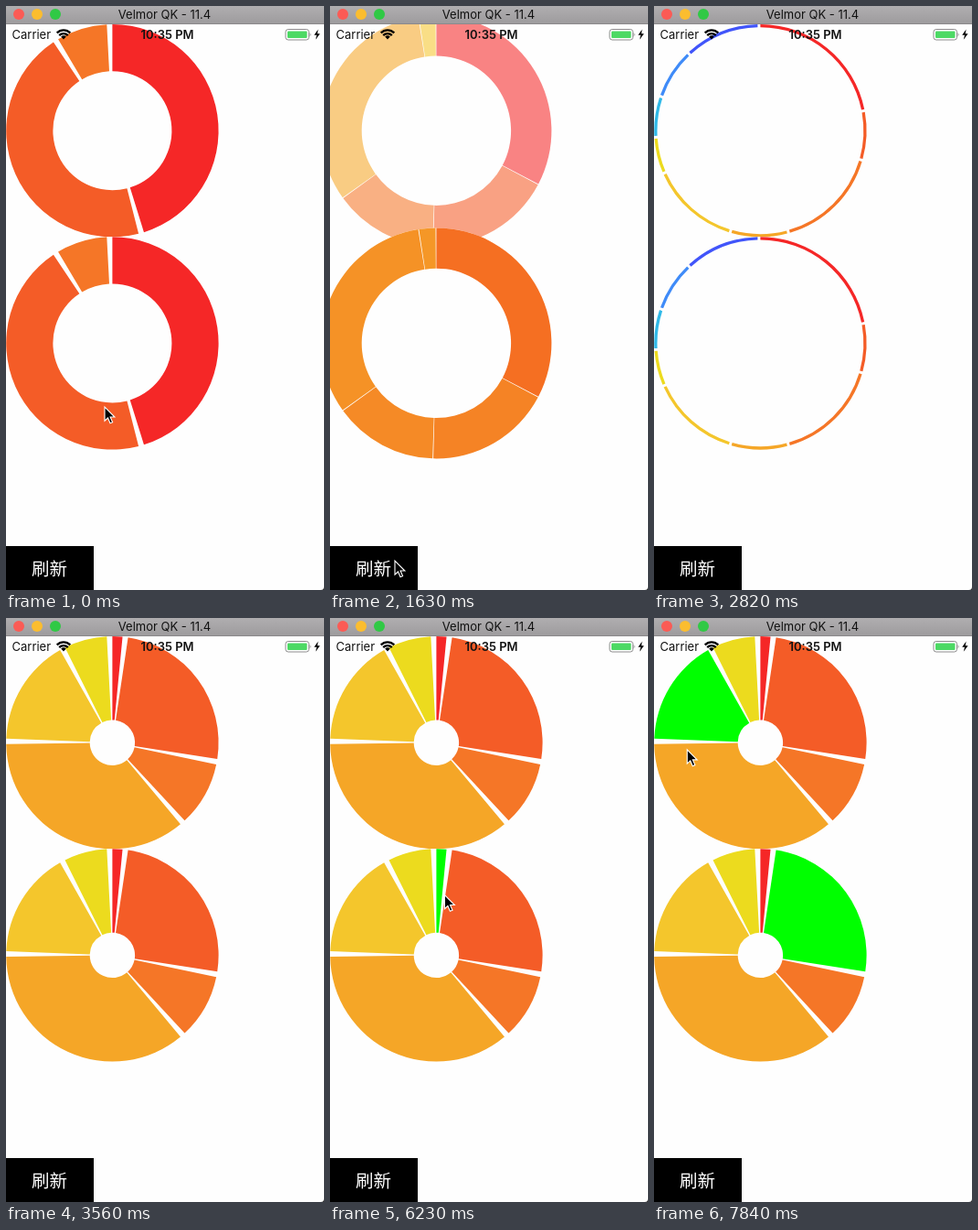
An HTML page for the animation above (7990 ms loop, 348 by 638 pixels).

```html
<!DOCTYPE html>
<html lang="en">
<head>
<meta charset="utf-8">
<title>Ring chart</title>
<style>
  html, body { margin: 0; width: 100%; height: 100%; overflow: hidden; background: #fefefe; }
  svg { display: block; width: 348px; height: 638px; }
  text { font-family: Inter, Roboto, sans-serif; font-size: 13px; }
  .cjk { font-family: "Noto Sans CJK SC", "Noto Sans CJK", sans-serif; font-size: 19.5px; font-weight: 300; }
</style>
</head>
<body>
<svg viewBox="0 0 348 638">
  <defs>
    <linearGradient id="bar" x2="0" y2="1">
      <stop offset="0" stop-color="#b0aeb0"/>
      <stop offset="1" stop-color="#9d9b9d"/>
    </linearGradient>
    <clipPath id="upper"><rect width="348" height="252.3"/></clipPath>
  </defs>
  <rect width="348" height="638" fill="#fefefe"/>
  <g id="top" clip-path="url(#upper)"></g>
  <g id="bottom"></g>

  <text x="6.5" y="35.8" fill="#111">Carrier</text>
  <g fill="none" stroke="#000" stroke-width="2.3">
    <path d="M55.7 29.4A10.3 10.3 0 0 1 70.3 29.4"/>
    <path d="M58.2 32.1A6.8 6.8 0 0 1 67.8 32.1"/>
  </g>
  <path d="M60.2 33.6A4 4 0 0 1 65.8 33.6L63 36.6Z"/>
  <text x="176.5" y="35.8" text-anchor="middle" font-weight="600" fill="#111">10:35 PM</text>
  <rect x="306" y="25.5" width="25.5" height="11.5" rx="2.8" fill="#fff" stroke="#8c8c8c"/>
  <rect x="308" y="27.4" width="21.5" height="7.7" rx="1" fill="#4cd964"/>
  <path d="M332.6 29.3Q334.6 31.2 332.6 33.2Z" fill="#8c8c8c"/>
  <path d="M341.6 25.6L337.2 31.8H340L338.8 36.8L343.6 30.2H340.7Z"/>

  <rect width="348" height="19.5" fill="url(#bar)"/>
  <rect y="19" width="348" height="1" fill="#8b898b"/>
  <circle cx="14" cy="9" r="6" fill="#fb5b55"/>
  <circle cx="34" cy="9" r="6" fill="#fbbd2f"/>
  <circle cx="54" cy="9" r="6" fill="#30c945"/>
  <text x="173.5" y="14" text-anchor="middle" fill="#111">Velmor QK - 11.4</text>

  <rect y="590" width="96" height="48"/>
  <text class="cjk" x="28" y="621.5" fill="#fff">刷新</text>
  <path d="M348 634.5V638H344.5Q348 638 348 634.5Z" fill="#222"/>
  <path id="cursor" d="M0 0V15.2L3.5 12L6 17.8L8.6 16.7L6.1 11H10.9Z" stroke="#fff" stroke-width="1.1"/>
</svg>
<script>
const LOOP = 7990, STEP = 148, CX = 116.4, CY = [136.2, 368.4], R = 116.2;
const BACK = '#fefefe', GREEN = '#00ff00';

const clamp = v => Math.max(0, Math.min(1, v));
const mix = (a, b, p) => a + (b - a) * p;

function blend(a, b, p) {
  const part = (c, i) => parseInt(c.slice(i, i + 2), 16);
  const hex = i => Math.round(mix(part(a, i), part(b, i), p)).toString(16).padStart(2, '0');
  return '#' + [1, 3, 5].map(hex).join('');
}

function polar(cy, r, deg) {
  const q = deg * Math.PI / 180;
  return [CX + r * Math.sin(q), cy - r * Math.cos(q)];
}

const palette = ['#f52727', '#f45c27', '#f57627', '#f5a627', '#f4c62c', '#ecdb1e', '#2fb9e8', '#3f8bf8', '#4155fa'];
const reversed = [...palette].reverse();
const ambers = palette.slice(0, 5).map((_, i) => blend('#f57122', '#f59627', Math.sqrt(i / 4)));

// Each refresh gives new slices (degrees, the last takes the rest) and eases in over FADE ms.
const FADE = 300;
const scenes = [
  { at: 0, spans: [165.7, 163.6], hole: 65 },
  { at: 680, spans: [7.3, 39.5, 104.4, 76, 41.1], r: 126, hole: 36.5, to: reversed },
  { at: 1620, spans: [118, 63.9, 52.6, 116.8], gap: .4, r: 126, hole: 81.7, from: [palette, ambers], fade: [.56, 1] },
  { at: 2140, spans: [79.9, 27, 58.4, 32, 49.7, 20.2, 22.5, 28.1], gap: 1.5, hole: 112.9, fade: [0, 0] },
  { at: 3180, spans: [8.5, 93.3, 38.3, 132.1, 61.3], hole: 24.7, fade: [0, 0] }
].map(s => {
  const starts = [0];
  s.spans.forEach(d => starts.push(starts[starts.length - 1] + d));
  return { gap: 3, r: R, from: [palette, palette], to: palette, fade: [1, 1], ...s, starts };
});

const line = (a, b) => p => a.map((v, i) => mix(v, b[i], p));
const orbit = (n, r, a, b) => p => polar(CY[n], r, mix(a, b, p));

// The pointer presses the button, leaves, then circles the lower and the upper chart.
const button = [71, 606], below = [168, 642];
const lower = orbit(1, 66.5, 51, 447), upper = orbit(0, 80.5, 60, -95.5);
const legs = [
  { end: 740, move: line([108, 438], button) },
  { end: 2220, move: () => button },
  { end: 2664, move: line(button, [68, 642]) },
  { end: 4600, move: () => below },
  { end: 5032, move: line(below, lower(0)) },
  { end: 6512, move: lower },
  { end: 7104, move: line(lower(1), upper(0)) },
  { end: 7844, move: upper }
];
// when each chart is touched, upper first
const touches = [[7104, 7700], [5032, 6512]];

function pointer(t) {
  const i = legs.findIndex(l => t <= l.end);
  const start = i ? legs[i - 1].end : 0;
  return legs[i].move((t - start) / (legs[i].end - start));
}

// The slice under the pointer while touched stays selected afterwards.
function selected(n, starts, t) {
  const [down, up] = touches[n];
  if (t < down) return -1;
  const [x, y] = pointer(Math.min(t, up));
  const deg = (Math.atan2(x - CX, CY[n] - y) * 180 / Math.PI + 360) % 360;
  return starts.filter(a => a <= deg).length - 1;
}

function sector(cy, r, hole, a, b) {
  const pt = (rad, deg) => polar(cy, rad, deg).map(v => v.toFixed(2)).join(' ');
  const big = b - a > 180 ? 1 : 0;
  return `M${pt(r, a)}A${r} ${r} 0 ${big} 1 ${pt(r, b)}L${pt(hole, b)}A${hole} ${hole} 0 ${big} 0 ${pt(hole, a)}Z`;
}

function add(parent, tag, attrs = {}) {
  const el = document.createElementNS('http://www.w3.org/2000/svg', tag);
  for (const k in attrs) el.setAttribute(k, attrs[k]);
  return parent.appendChild(el);
}

const charts = ['top', 'bottom'].map((id, n) => {
  const group = document.getElementById(id);
  const disc = add(group, 'circle', { cx: CX, cy: CY[n], fill: BACK });
  return { n, group, disc, slices: palette.map(() => add(group, 'path')) };
});
const cursor = document.getElementById('cursor');

function drawChart({ n, group, disc, slices }, t) {
  const s = scenes.filter(e => e.at <= t).pop();
  const p = clamp((t - s.at) / FADE);
  const pick = selected(n, s.starts, t);
  group.setAttribute('opacity', mix(s.fade[n], 1, p));
  disc.setAttribute('r', s.r);
  slices.forEach((el, i) => {
    const a = s.starts[i], b = (s.starts[i + 1] ?? 360) - s.gap;
    el.setAttribute('d', a === undefined ? '' : sector(CY[n], s.r, s.hole, a, b));
    if (a !== undefined) el.setAttribute('fill', i === pick ? GREEN : blend(s.from[n][i], s.to[i], p));
  });
}

function render(time) {
  const t = Math.floor((time % LOOP + 8) / STEP) * STEP;
  charts.forEach(c => drawChart(c, t));
  cursor.setAttribute('transform', `translate(${pointer(t)})`);
}

const t0 = performance.now();
function tick() {
  render(performance.now() - t0);
  requestAnimationFrame(tick);
}
tick();
</script>
</body>
</html>
```
